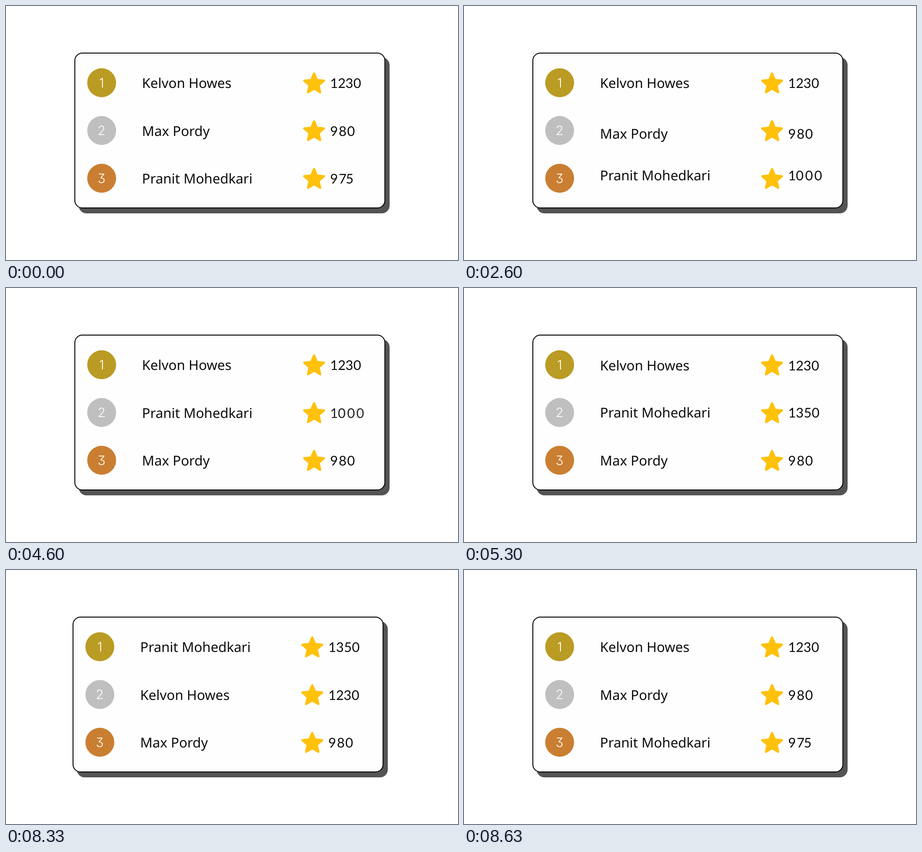
Recreate the animation shown at these times as an HTML page. Size 998 by 561 pixels, loop 8.96 s.

```html
<!DOCTYPE html>
<html lang="en">
<head>
<meta charset="utf-8">
<title>Leaderboard</title>
<style>
  html, body { margin: 0; width: 100%; height: 100%; overflow: hidden; background: #fff; }
  svg { display: block; width: 998px; height: 561px; }
  text { text-rendering: geometricPrecision; }
  .name { font: 30px "Noto Sans", "Open Sans", sans-serif; fill: #0c0c0c; }
  .score { font: 29.5px Lato, "Open Sans", sans-serif; fill: #0c0c0c; }
  .rank { font: 350 28.5px Inter, sans-serif; font-feature-settings: "cv09"; fill: #fff; text-anchor: middle; }
  .shadow { fill: #545454; }
  .card { fill: #fefefe; stroke: #000; stroke-width: 2; }
  .star { fill: #ffc10a; stroke: #ffc10a; stroke-width: 5; stroke-linejoin: round; }
</style>
</head>
<body>
<svg id="stage" viewBox="0 0 998 561"></svg>
<script>
const LOOP = 8960, STEP = 100 / 3, WIDTH = 998, PITCH = 105.5;
const BADGES = ['#ba9b23', '#bfbfbf', '#ca7e31'];
const PLAYERS = [
  { name: 'Kelvon Howes', scores: ['1230'] },
  { name: 'Max Pordy', scores: ['980'] },
  { name: 'Pranit Mohedkari', scores: ['975', '1000', '1350'] }
];
// Horizontal advance of each numeral in the score column
const ADVANCE = { 0: 20.4, 1: 17, 2: 16.6, 3: 17.5, 5: 17.5, 7: 15.5, 8: 18.5, 9: 19 };
// Start and length of each change, in steps of 1/30 s
const CUES = {
  firstFade: [54, 12],
  firstSwap: [75, 12],
  secondFade: [137, 11],
  secondSwap: [157.5, 11.5],
  push: [249, 10]
};

const stage = document.getElementById('stage');

function add(parent, tag, attrs = {}, text = '') {
  const el = document.createElementNS('http://www.w3.org/2000/svg', tag);
  for (const key in attrs) el.setAttribute(key, attrs[key]);
  el.textContent = text;
  return parent.appendChild(el);
}

function starPoints(cx, cy) {
  return Array.from({ length: 10 }, (_, i) => {
    const r = i % 2 ? 10.4 : 22.8, a = i * Math.PI / 5;
    return `${(cx + r * Math.sin(a)).toFixed(2)},${(cy - r * Math.cos(a)).toFixed(2)}`;
  }).join(' ');
}

function digitPositions(score) {
  let x = 715.8;
  return [...score].map(d => {
    const at = x;
    x += ADVANCE[d];
    return at.toFixed(1);
  }).join(' ');
}

function buildSlide() {
  const root = add(stage, 'g');
  add(root, 'rect', { class: 'shadow', x: 160.5, y: 113.5, width: 686.5, height: 344.5, rx: 17 });
  add(root, 'rect', { class: 'card', x: 152, y: 104, width: 684.5, height: 342, rx: 16.5 });
  BADGES.forEach((fill, i) => {
    const dy = i * PITCH;
    add(root, 'circle', { cx: 211.2, cy: 169.5 + dy, r: 31.9, fill });
    add(root, 'text', { class: 'rank', x: 211, y: 179.8 + dy }, i + 1);
    add(root, 'polygon', { class: 'star', points: starPoints(680.2, 172 + dy) });
  });
  const rows = PLAYERS.map(({ name, scores }) => {
    const g = add(root, 'g');
    add(g, 'text', { class: 'name', x: 300.3, y: 181 }, name);
    const labels = scores.map(s =>
      add(g, 'text', { class: 'score', x: digitPositions(s), y: 181 }, s));
    return { g, labels };
  });
  return { root, rows };
}

const ease = t => t < 0.5 ? 4 * t ** 3 : 1 - 4 * (1 - t) ** 3;

function progress(cue, step) {
  const [start, length] = CUES[cue];
  return Math.min(1, Math.max(0, (step - start) / length));
}

function pose({ root, rows }, step, shift) {
  const swapA = ease(progress('firstSwap', step));
  const swapB = ease(progress('secondSwap', step));
  const fadeA = progress('firstFade', step);
  const fadeB = progress('secondFade', step);
  root.setAttribute('transform', `translate(${shift} 0)`);
  [swapB, 1 + swapA, 2 - swapA - swapB].forEach((row, i) =>
    rows[i].g.setAttribute('transform', `translate(0 ${row * PITCH})`));
  [1 - fadeA, fadeA - fadeB, fadeB].forEach((alpha, i) =>
    rows[2].labels[i].setAttribute('opacity', alpha));
}

const current = buildSlide();
const incoming = buildSlide();

function draw(ms) {
  const step = Math.floor((ms % LOOP + 4) / STEP);
  const push = ease(progress('push', step));
  pose(current, step, -WIDTH * push);
  pose(incoming, 0, WIDTH * (1 - push));
}

const begin = performance.now();
function tick() {
  draw(performance.now() - begin);
  requestAnimationFrame(tick);
}
tick();
</script>
</body>
</html>
```
